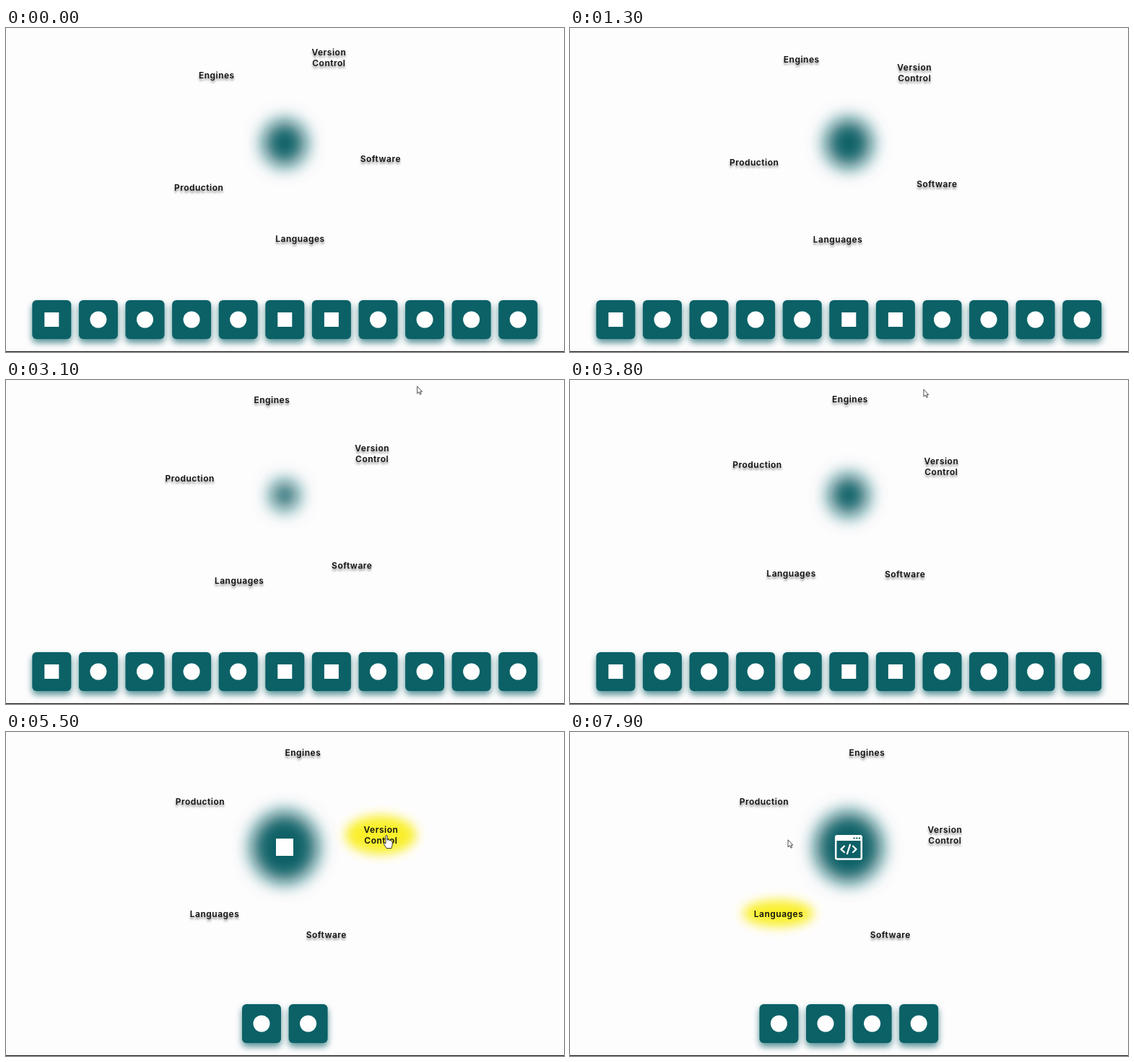
Recreate the animation shown at these times as an HTML page. Size 773 by 450 pixels, loop 8000 ms.

```html
<!DOCTYPE html>
<html lang="en">
<head>
<meta charset="utf-8">
<title>Skill wheel</title>
<style>
  html, body { margin: 0; width: 100%; height: 100%; overflow: hidden; background: #fefdfe; }
  svg { display: block; width: 773px; height: 450px; }
  text { font: 600 12px Inter, "Open Sans", sans-serif; letter-spacing: .5px; fill: #111; text-anchor: middle; }
  .tile { filter: drop-shadow(0 5px 5px rgba(11, 97, 102, .7)); }
  .line { fill: none; stroke: #fff; stroke-width: 2.5; stroke-linecap: round; stroke-linejoin: round; }
</style>
</head>
<body>
<svg viewBox="0 0 773 450">
  <defs>
    <filter id="soft" x="-150%" y="-150%" width="400%" height="400%"><feGaussianBlur stdDeviation="13"/></filter>
    <filter id="glow" x="-50%" y="-100%" width="200%" height="300%"><feGaussianBlur stdDeviation="7.5"/></filter>
  </defs>
  <rect width="773" height="450" fill="#fefdfe"/>
  <ellipse id="blob" cx="386" cy="160" fill="#0b6166" filter="url(#soft)"/>
  <g class="icon"><rect x="374" y="148" width="24" height="24" fill="#fff"/></g>
  <g class="icon">
    <g class="line">
      <rect x="371.3" y="146.2" width="27" height="27" rx="4"/>
      <path d="M371 152.5H398" stroke-width="2"/>
      <path d="M381.5 157.5L377 161.5L381.5 165.5M387 157.5L391.5 161.5L387 165.5" style="stroke-width:1.7"/>
    </g>
    <path d="M391 174L396.5 164.5" stroke="#0b6166" stroke-width="9" stroke-linecap="round"/>
    <circle cx="398" cy="161.5" r="8" fill="#0b6166"/>
    <path d="M391 174L396.5 165" class="line" style="stroke-width:4.5"/>
    <path d="M398.5 155.5A6.2 6.2 0 1 0 403.5 160L399.5 162.5L396.7 160.5Z" fill="#fff"/>
  </g>
  <g class="icon">
    <rect x="368.2" y="144.2" width="35.6" height="32.4" rx="2" class="line"/>
    <path d="M368 144H404V151H368Z" fill="#fff"/>
    <path d="M392.5 147.5H402" stroke="#0b6166" stroke-width="2.2" stroke-dasharray="2.2 1.5"/>
    <path class="line" d="M380 158.5L375.5 162.8L380 167M392 158.5L396.5 162.8L392 167M388 156.5L384 169" style="stroke-width:2.3"/>
  </g>
  <g id="labels"></g>
  <g id="tiles"></g>
  <rect y="449" width="773" height="1" fill="#111"/>
  <g id="cursor">
    <path id="arrow" d="M0 0V10L2.4 7.9L4 11.4L5.5 10.7L4 7.4H6.8Z" fill="#fff" stroke="#222" stroke-width=".8"/>
    <path id="hand" d="M-1 12V1.2Q0 -.5 1.2 1.2V7Q2.8 5.8 3.8 7.4Q5.3 6.5 6.2 8Q8.2 7.5 8.2 10V14L6.8 18.5H.2L-3.6 12.5Q-3.5 10 -1 12Z" fill="#fff" stroke="#222" stroke-width=".9"/>
  </g>
</svg>
<script>
const LOOP = 8000, CX = 386, CY = 160, RADIUS = 134, STOP = 4640, FADE = 300;
const NS = "http://www.w3.org/2000/svg";
const $ = id => document.getElementById(id);
const clamp = v => Math.max(0, Math.min(1, v));
const ease = v => { v = clamp(v); return v * v * (3 - 2 * v); };

function add(parent, tag, attrs, text) {
  const el = document.createElementNS(NS, tag);
  for (const key in attrs) el.setAttribute(key, attrs[key]);
  if (text) el.textContent = text;
  return parent.appendChild(el);
}

// Each selection names its label, its active time and the tiles it keeps
const picks = [
  { label: 1, from: STOP, swap: 4700, to: 6220, tiles: [3, 4] },
  { label: 2, from: 6220, swap: 6270, to: 7120, tiles: [5, 6] },
  { label: 3, from: 7120, swap: 7280, to: 9000, tiles: [7, 8, 9, 10] }
];

const labels = ["Engines", "Version Control", "Software", "Languages", "Production"].map((name, i) => {
  const lines = name.split(" "), group = add($("labels"), "g");
  const glow = add(group, "ellipse", { rx: 49, ry: 10 + 8.5 * lines.length, fill: "#f9ef2c", filter: "url(#glow)" });
  const words = add(group, "g");
  lines.forEach((line, n) => add(words, "text", { x: 0.5, y: 5 + 15 * (n - (lines.length - 1) / 2) }, line));
  return { group, glow, words, start: -135 + 72 * i, reach: 4 + 10 * lines.length,
           pick: picks.find(p => p.label === i) };
});

const squares = [0, 5, 6];
const tiles = Array.from({ length: 11 }, (_, i) => {
  const tile = add($("tiles"), "g", { class: "tile" });
  add(tile, "rect", { x: -27, y: -27, width: 54, height: 54, rx: 6, fill: "#0b6166" });
  if (squares.includes(i)) add(tile, "rect", { x: -10, y: -10, width: 20, height: 20, fill: "#fff" });
  else add(tile, "circle", { r: 11.5, fill: "#fff" });
  return tile;
});
const allTiles = tiles.map((_, i) => i);
const icons = [...document.querySelectorAll(".icon")];

// Pointer path: time, x, y
const path = [
  [1950, 772, 38], [2300, 724, 27], [2700, 640, 14], [3300, 540, 8], [3800, 490, 13],
  [4200, 495, 55], [4600, 515, 122], [5000, 526, 143], [5500, 527, 143], [5800, 520, 190],
  [6200, 462, 272], [6500, 430, 280], [6900, 347, 259], [7200, 300, 252], [7500, 290, 243],
  [7900, 302, 150], [8000, 299, 130]
];

function pointerAt(t) {
  const last = path.length - 1;
  let i = 0;
  while (i < last - 1 && t >= path[i + 1][0]) i++;
  const a = path[i], b = path[i + 1], span = b[0] - a[0], u = clamp((t - a[0]) / span);
  const slope = (k, axis) => {
    const p = path[Math.max(0, k - 1)], q = path[Math.min(last, k + 1)];
    return (q[axis] - p[axis]) / (q[0] - p[0]) * span;
  };
  const u2 = u * u, u3 = u2 * u;
  return [1, 2].map(axis =>
    a[axis] * (2 * u3 - 3 * u2 + 1) + b[axis] * (3 * u2 - 2 * u3) +
    slope(i, axis) * (u3 - 2 * u2 + u) + slope(i + 1, axis) * (u3 - u2));
}

function render(t) {
  const [px, py] = pointerAt(t);
  let hovering = false;
  for (const { group, glow, words, start, reach, pick } of labels) {
    const angle = (start + 0.012 * Math.min(t, STOP)) * Math.PI / 180;
    const x = CX + RADIUS * Math.cos(angle), y = CY + RADIUS * Math.sin(angle);
    const lit = pick ? ease((t - pick.from) / FADE) - ease((t - pick.to) / FADE) : 0;
    group.setAttribute("transform", `translate(${x} ${y})`);
    glow.setAttribute("opacity", lit);
    words.style.filter = `drop-shadow(0 3px 1.5px rgba(0,0,0,${0.45 * (1 - lit)}))`;
    if (pick && t >= STOP && Math.abs(px - x) < 38 && Math.abs(py - y) < reach) hovering = true;
  }

  const pulse = 26.3 + 8.7 * Math.cos((Math.min(t, STOP) - 750) * Math.PI / 2000);
  const r = pulse + (46 - pulse) * ease((t - STOP) / FADE);
  $("blob").setAttribute("rx", r);
  $("blob").setAttribute("ry", r * 1.06);
  icons.forEach((icon, i) => {
    const { from, to } = picks[i];
    icon.setAttribute("opacity", t < to ? ease((t - from) / 200) : 0);
  });

  const current = picks.filter(p => t >= p.swap).pop();
  const shown = current ? current.tiles : allTiles;
  tiles.forEach((tile, i) => {
    const slot = shown.indexOf(i);
    tile.style.display = slot < 0 ? "none" : "";
    tile.setAttribute("transform", `translate(${386.3 + 64.6 * (slot - (shown.length - 1) / 2)} 405)`);
  });

  $("cursor").style.display = t < path[0][0] ? "none" : "";
  $("cursor").setAttribute("transform", `translate(${px} ${py})`);
  $("arrow").style.display = hovering ? "none" : "";
  $("hand").style.display = hovering ? "" : "none";
}

const began = performance.now();
function tick() {
  render((performance.now() - began) % LOOP);
  requestAnimationFrame(tick);
}
tick();
</script>
</body>
</html>
```
